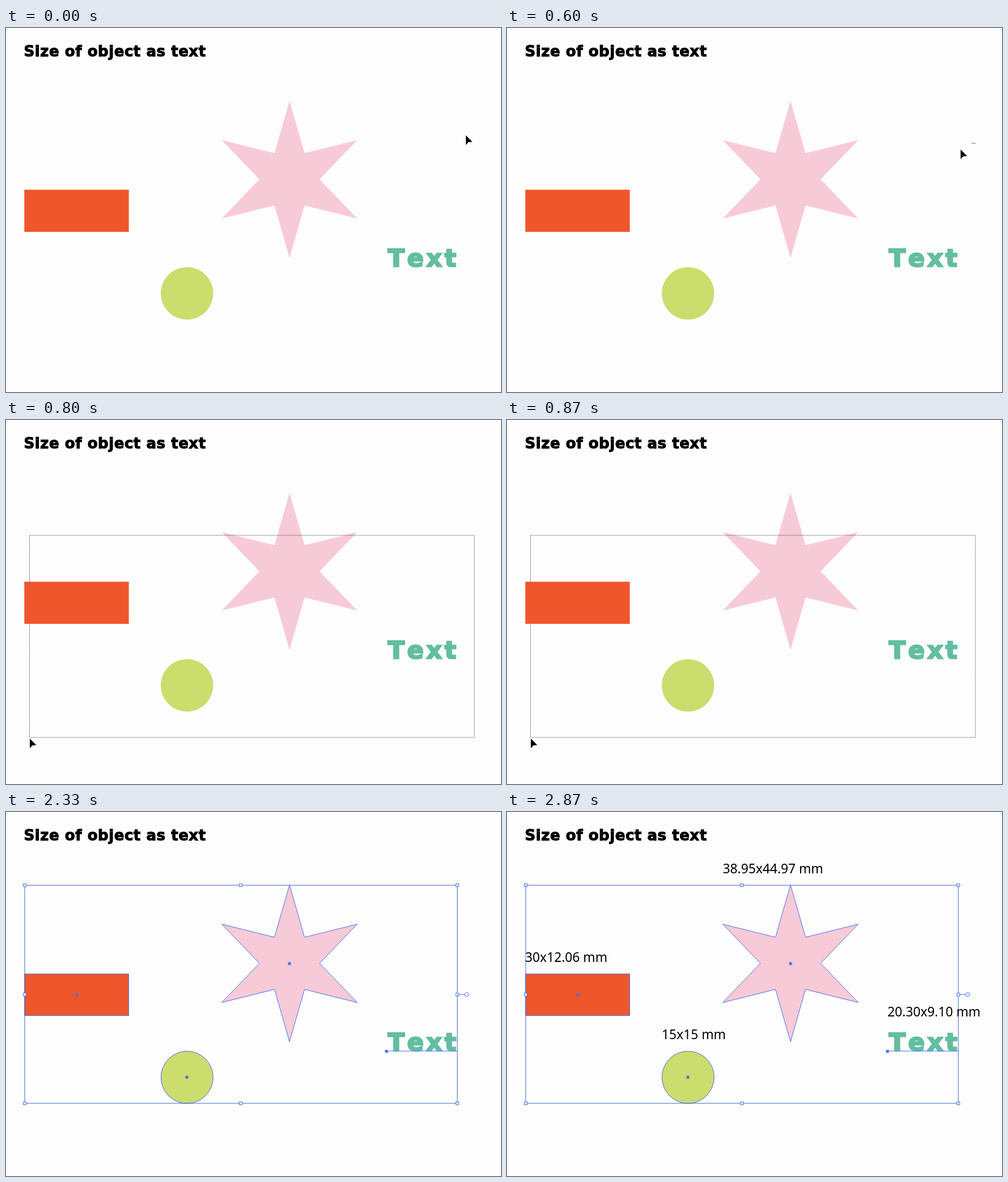
Recreate the animation shown at these times as an HTML page. Size 873x641 px, loop 3540 ms.

```html
<!DOCTYPE html>
<html lang="en">
<head>
<meta charset="utf-8">
<title>Size of object as text</title>
<style>
  html, body { margin: 0; width: 100%; height: 100%; overflow: hidden; background: #fdfdfd; }
  svg { display: block; width: 873px; height: 641px; }

  .bold { font-family: "DejaVu Sans", sans-serif; font-weight: 700; font-kerning: none; }
  .title { font-size: 26px; letter-spacing: .55px; stroke: #000; stroke-width: 1.1; }
  .word { font-size: 43px; letter-spacing: 4.6px; fill: #63bda0; stroke: #63bda0; stroke-width: 2.6; }
  .label { font: 22.8px "Noto Sans", "Open Sans", sans-serif; }

  .outline { fill: none; stroke: #4470f2; stroke-width: 1; }
  .frame { fill: none; stroke: #4166cc; stroke-width: 1; }
  .handle { fill: #fff; stroke: #4470f2; stroke-width: 1; }
  .dot { fill: #4470f2; }
  .marquee { fill: none; stroke: #2a2a2a; stroke-width: 1; stroke-dasharray: 1.2 1.45; }

  .cursor, .marquee, .picked, .label { animation: 3540ms step-end infinite; }
  .cursor { animation-name: point; }
  .marquee { animation-name: drag; }
  .picked { animation-name: pick; }
  .l1 { animation-name: show1; }
  .l2 { animation-name: show2; }
  .l3 { animation-name: show3; }
  .l4 { animation-name: show4; }

  @keyframes point {
    0%     { transform: translate(811px, 189px); visibility: visible; }
    1.97%  { transform: translate(830px, 187px); }
    3.67%  { transform: translate(848px, 189px); }
    5.64%  { transform: translate(854px, 194px); }
    7.62%  { transform: translate(843px, 199px); }
    9.32%  { transform: translate(826px, 203px); }
    11.29% { transform: translate(800px, 207px); }
    13.27% { transform: translate(800px, 210px); }
    14.97% { transform: translate(800px, 212px); }
    16.94% { transform: translate(800px, 214px); }
    18.92% { transform: translate(640px, 300px); }
    20.62% { transform: translate(300px, 470px); }
    22.59% { transform: translate(42px, 561px); visibility: visible; }
    30.22%, 100% { transform: translate(42px, 561px); visibility: hidden; }
  }
  @keyframes drag {
    0%     { x: 820px; y: 203px; width: 6px; height: .1px; visibility: hidden; }
    16.94% { x: 820px; y: 203px; width: 6px; height: .1px; visibility: visible; }
    18.92% { x: 760px; y: 203px; width: 66px; height: 29px; visibility: visible; }
    20.62% { x: 420px; y: 203px; width: 406px; height: 207px; visibility: visible; }
    22.59% { x: 41.5px; y: 203px; width: 784.5px; height: 356px; visibility: visible; }
    28.24%, 100% { x: 41.5px; y: 203px; width: 784.5px; height: 356px; visibility: hidden; }
  }
  @keyframes pick  { 0% { visibility: hidden; } 28.24%, 100% { visibility: visible; } }
  @keyframes show1 { 0% { visibility: hidden; } 69.77%, 100% { visibility: visible; } }
  @keyframes show2 { 0% { visibility: hidden; } 73.44%, 100% { visibility: visible; } }
  @keyframes show3 { 0% { visibility: hidden; } 77.11%, 100% { visibility: visible; } }
  @keyframes show4 { 0% { visibility: hidden; } 81.07%, 100% { visibility: visible; } }
</style>
</head>
<body>
<svg viewBox="0 0 873 641">
  <defs>
    <path id="star" d="M500 128.5 526.5 220.6 619.5 197.5 553 266.5 619.5 335.5 526.5 312.4 500 404.5 473.5 312.4 380.5 335.5 447 266.5 380.5 197.5 473.5 220.6Z"/>
    <rect id="handle" x="-2.5" y="-2.5" width="5" height="5"/>
    <rect id="dot" x="-2.5" y="-2.5" width="5" height="5"/>
  </defs>

  <text class="bold title" x="31.6" y="49.7">Size of object as text</text>

  <use href="#star" fill="#f7cad7"/>
  <circle cx="319.2" cy="467.3" r="46.2" fill="#cbdd6d"/>
  <text class="bold word" x="673.5" y="420.3">Text</text>
  <rect class="marquee" x="820" y="203" width="6" height=".1"/>
  <rect x="32.3" y="284.8" width="184.3" height="74.2" fill="#f0562b"/>

  <g class="picked">
    <rect class="frame" x="33" y="129" width="763" height="384"/>
    <use class="outline" href="#star"/>
    <circle class="outline" cx="319.3" cy="467.2" r="46"/>
    <rect class="outline" x="33" y="285.3" width="183.3" height="73.2"/>
    <path class="outline" d="M671 421H796M796 321.5H809"/>
    <g class="dot">
      <use href="#dot" x="500" y="267"/>
      <use href="#dot" x="319" y="467"/>
      <use href="#dot" x="124.5" y="322"/>
      <use href="#dot" x="671" y="421.5"/>
    </g>
    <g class="handle">
      <use href="#handle" x="33" y="129"/>
      <use href="#handle" x="414" y="129"/>
      <use href="#handle" x="796" y="129"/>
      <use href="#handle" x="33" y="321.5"/>
      <use href="#handle" x="796" y="321.5"/>
      <use href="#handle" x="33" y="513"/>
      <use href="#handle" x="414" y="513"/>
      <use href="#handle" x="796" y="513"/>
      <circle cx="812.5" cy="321.5" r="3.5"/>
    </g>
  </g>

  <text class="label l1" x="32" y="263.5">30x12.06 mm</text>
  <text class="label l2" x="273" y="399.5">15x15 mm</text>
  <text class="label l3" x="380.5" y="107.5">38.95x44.97 mm</text>
  <text class="label l4" x="671" y="359.5">20.30x9.10 mm</text>

  <path class="cursor" d="M0 0V17L4.5 12 11.5 11.5Z"/>
</svg>
</body>
</html>
```
